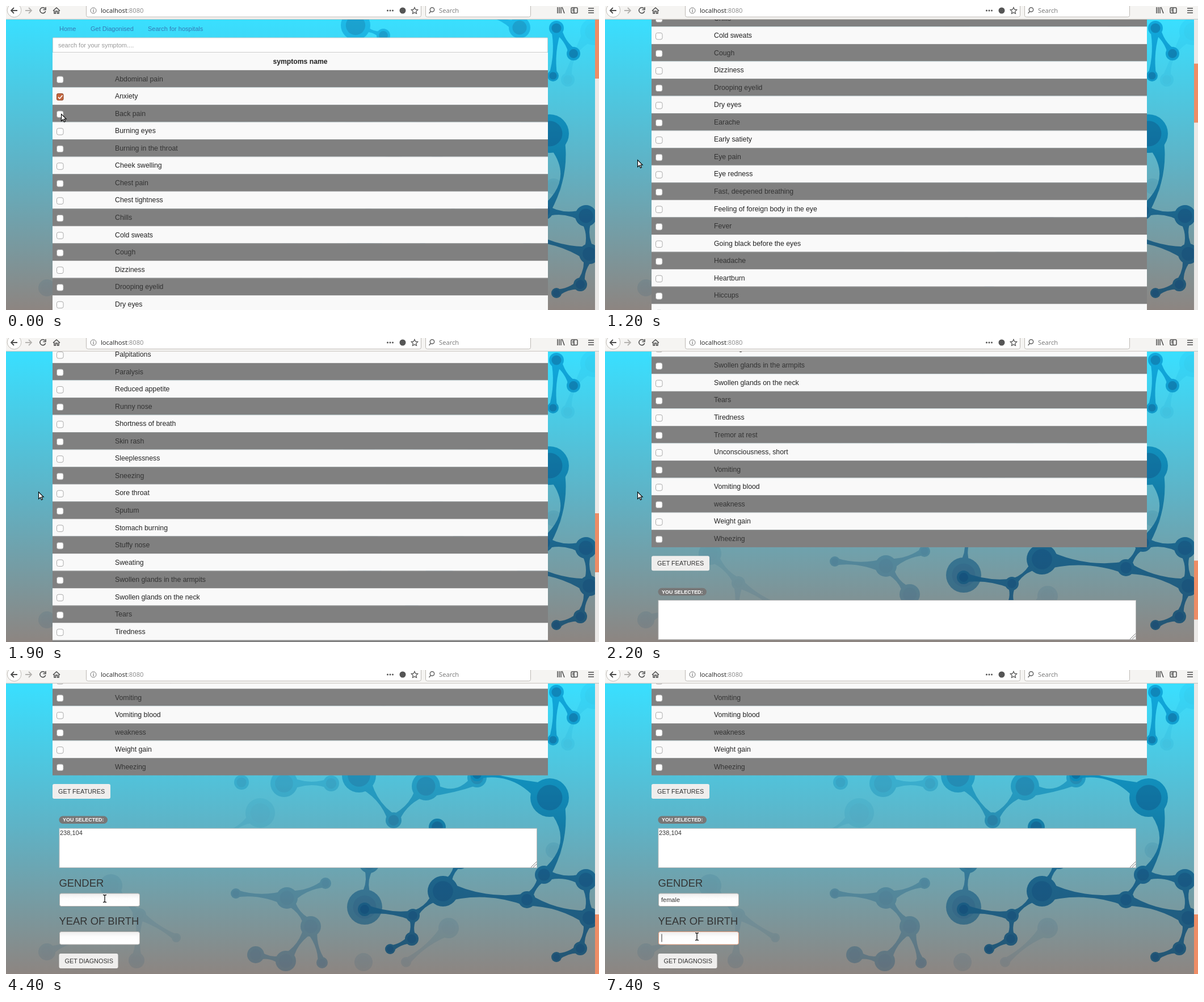
Animation, 1045 px wide and 536 px high, one loop 8 s. Source, as an HTML page:

```html
<!DOCTYPE html>
<html lang="en">
<head>
<meta charset="utf-8">
<title>Symptom checker</title>
<style>
  html, body { margin: 0; width: 100%; height: 100%; overflow: hidden; }
  svg { display: block; width: 1045px; height: 536px; font-family: "Liberation Sans", Arial, sans-serif; }
  text { white-space: pre; }
  .ui { font: 11.2px "Open Sans", sans-serif; }
  .icon { fill: none; stroke: #4b4b4b; stroke-width: 1.5; }
</style>
</head>
<body>
<svg viewBox="0 0 1045 536">
  <defs>
    <linearGradient id="sky" gradientUnits="userSpaceOnUse" x1="0" y1="24" x2="0" y2="536">
      <stop offset="0" stop-color="#39dfff"/><stop offset=".5" stop-color="#5fb2c5"/><stop offset="1" stop-color="#8d8581"/>
    </linearGradient>
    <linearGradient id="deep" gradientUnits="userSpaceOnUse" x1="0" y1="24" x2="0" y2="536">
      <stop offset="0" stop-color="#0ea6dc"/><stop offset=".39" stop-color="#0c86b4"/>
      <stop offset=".68" stop-color="#175f88"/><stop offset="1" stop-color="#1d5070"/>
    </linearGradient>
    <linearGradient id="field" x2="0" y2="1">
      <stop offset="0" stop-color="#ededed"/><stop offset=".4" stop-color="#fdfdfd"/><stop offset="1" stop-color="#fff"/>
    </linearGradient>
  </defs>
  <rect width="1045" height="536" fill="url(#sky)"/>
  <g id="molecules" fill="url(#deep)"></g>
  <g id="page"></g>

  <rect x="1038" y="24" width="7" height="512" fill="#ebe9e7"/>
  <rect id="thumb" x="1038" y="24" width="7" height="104" fill="#ee8d66"/>

  <rect width="1045" height="23.5" fill="#f5f4f2"/>
  <path d="M0 23.3H1045" stroke="#c9c4be"/>
  <g fill="#fff" stroke="#bdb9b4">
    <rect x="141.5" y="-9" width="590" height="28.3" rx="3"/>
    <rect x="739.5" y="-9" width="185" height="28.3" rx="3"/>
    <circle cx="14.500" cy="7.500" r="12.300"/>
  </g>
  <g class="icon">
    <path d="M20 8H9m5-5-5 5 5 5" stroke-width="1.8"/>
    <path d="M34 8H45m-5-5 5 5-5 5" stroke="#b5b3b0" stroke-width="1.8"/>
    <path d="M68.700 4.500A5 5 0 1 0 69.700 9M70 2v4.500h-4.500"/>
    <path d="M83 8.500 89 3l6 5.500M85 8v5h2.500v-4h3v4H93V8"/>
    <circle cx="154" cy="8" r="5" stroke="#777" stroke-width="1"/>
    <path d="M154 7v4m0-6v1.300" stroke="#777" stroke-width="1.200"/>
    <path d="m720 2.500 1.700 3.700 4 .5-3 2.700.8 4-3.500-2-3.500 2 .8-4-3-2.700 4-.5z" stroke-width="1.200"/>
    <circle cx="751" cy="6.500" r="3.700" stroke="#666"/>
    <path d="M748.500 9.500 745.500 13" stroke="#666"/>
    <path d="M972 2v11m3-11v11m3-11v11m2-11 4 11"/>
    <rect x="996" y="3" width="11" height="9.500" rx="1.500"/>
    <path d="M1001 3v9M998 6h2m-2 2.500h2M1026 4h10m-10 4h10m-10 4h10"/>
  </g>
  <g fill="#555">
    <circle cx="672.500" cy="8" r="1.500"/><circle cx="677" cy="8" r="1.500"/><circle cx="681.500" cy="8" r="1.500"/>
    <circle cx="699" cy="8" r="5.500"/>
  </g>
  <text class="ui" x="167" y="12" fill="#222">localhost<tspan fill="#888">:8080</tspan></text>
  <text class="ui" x="763" y="12" fill="#777">Search</text>

  <path id="arrow" d="M.5.5v12.300l3-2.800 2 4.500 2-.9-2-4.300h3.700z" fill="#fff" stroke="#000" stroke-width="1.100"/>
  <g id="beam" fill="none">
    <path d="M-3-6.500q3 0 3 1.500q0-1.500 3-1.500M0-5V5M-3 6.500q3 0 3-1.500q0 1.500 3 1.500" stroke="#fff" stroke-width="2.600"/>
    <path d="M-3-6.500q3 0 3 1.500q0-1.500 3-1.500M0-5V5M-3 6.500q3 0 3-1.500q0 1.500 3 1.500" stroke="#111" stroke-width="1.300"/>
  </g>
</svg>
<script>
const $ = id => document.getElementById(id);
const ROW = 30.55, TABLE_TOP = 113, MAX_SCROLL = 1852, LOOP = 8000;

const symptoms = `Abdominal pain|Anxiety|Back pain|Burning eyes|Burning in the throat|Cheek swelling|Chest pain|
Chest tightness|Chills|Cold sweats|Cough|Dizziness|Drooping eyelid|Dry eyes|Earache|Early satiety|Eye pain|Eye redness|
Fast, deepened breathing|Feeling of foreign body in the eye|Fever|Going black before the eyes|Headache|Heartburn|Hiccups|
Hot flashes|Increased thirst|Itching eyes|Itching in the nose|Lip swelling|Memory gap|Menstruation disorder|Missed period|
Nausea|Neck pain|Nervousness|Night cough|Pain in the limbs|Pain on swallowing|Palpitations|Paralysis|Reduced appetite|
Runny nose|Shortness of breath|Skin rash|Sleeplessness|Sneezing|Sore throat|Sputum|Stomach burning|Stuffy nose|Sweating|
Swollen glands in the armpits|Swollen glands on the neck|Tears|Tiredness|Tremor at rest|Unconsciousness, short|Vomiting|
Vomiting blood|weakness|Weight gain|Wheezing`.replace(/\n/g, '').split('|');

// Molecules: nodes are [x, y, radius], bonds are [from, to, bend]
const clusters = [
  { opacity: .12, nodes: [[72, 497, 15], [125, 475, 8], [185, 380, 20], [235, 432, 12], [300, 472, 8], [230, 512, 14],
      [448, 252, 26], [387, 290, 8], [965, 318, 14], [1036, 45, 24], [990, 130, 12], [630, 515, 16], [780, 455, 18], [705, 515, 9]],
    bonds: [[0, 1], [2, 3], [3, 4], [3, 5], [6, 7], [9, 10, 20], [12, 13]] },
  { opacity: .35, nodes: [[495, 402, 19], [405, 394, 9], [563, 376, 10], [537, 452, 18], [440, 502, 15], [493, 513, 18],
      [557, 516, 10], [490, 200, 24], [573, 200, 14], [415, 198, 13]],
    bonds: [[0, 1], [0, 2], [0, 3], [3, 5], [4, 5], [3, 6], [7, 8]] },
  { opacity: .65, nodes: [[616, 34, 26], [665, 52, 12], [632, 418, 31], [640, 340, 18], [622, 186, 30], [740, 205, 25],
      [830, 190, 17], [683, 265, 14], [905, 38, 19], [845, 12, 10]],
    bonds: [[0, 1], [2, 3], [4, 7], [5, 6, 30], [5, 7], [8, 9]] },
  { opacity: .93, nodes: [[958, 225, 34], [948, 361, 16], [1022, 370, 19], [918, 405, 15], [1028, 437, 18], [1012, 491, 12],
      [970, 506, 9], [770, 390, 27], [717, 433, 12], [715, 474, 12], [677, 492, 9], [632, 422, 12], [970, 39, 13],
      [1000, 84, 12], [964, 123, 10], [800, 335, 16], [760, 277, 15], [830, 184, 12]],
    bonds: [[0, 1, -55], [1, 2], [1, 3], [2, 4], [3, 4], [4, 5], [5, 6], [3, 7], [7, 8], [8, 9], [9, 10], [8, 11],
      [12, 13], [12, 14], [7, 15], [0, 17, 20]] }
];

function bond([x1, y1, r1], [x2, y2, r2], bend = 0) {
  const dx = x2 - x1, dy = y2 - y1, len = Math.hypot(dx, dy), nx = -dy / len, ny = dx / len;
  const a = r1 * .75, b = r2 * .75, waist = 6.5 - (a + b) / 2;
  const at = (x, y, d) => `${(x + nx * d).toFixed(1)} ${(y + ny * d).toFixed(1)}`;
  const mx = (x1 + x2) / 2, my = (y1 + y2) / 2;
  return `<path d="M${at(x1, y1, a)}Q${at(mx, my, bend + waist)} ${at(x2, y2, b)}L${at(x2, y2, -b)}` +
    `Q${at(mx, my, bend - waist)} ${at(x1, y1, -a)}Z"/>`;
}

$('molecules').innerHTML = clusters.map(({ opacity, nodes, bonds }) =>
  `<g opacity="${opacity}">` +
  bonds.map(([i, j, bend]) => bond(nodes[i], nodes[j], bend)).join('') +
  nodes.map(([x, y, r]) => `<circle cx="${x}" cy="${y}" r="${r}"/>` +
    `<circle cx="${x}" cy="${y}" r="${r * .66}" fill="#0b3f72" opacity=".35"/>`).join('') + '</g>').join('');

const rect = (x, y, w, h, fill, more = '') =>
  `<rect x="${x}" y="${y}" width="${w}" height="${h}" fill="${fill}" ${more}/>`;
const text = (x, y, size, str, fill = '#333', more = '') =>
  `<text x="${x}" y="${y}" font-size="${size}" fill="${fill}" ${more}>${str}</text>`;
const button = (x, y, w, label) => rect(x, y, w, 26, '#efeeed', 'rx="3"') + text(x + 10, y + 17, 10.85, label);
const input = (id, y) => rect(94.5, y, 141, 22.5, 'url(#field)', `id="${id}" rx="3"`);

function tableRow(name, i) {
  const y = TABLE_TOP + i * ROW, odd = i % 2;
  return rect(82, y, 873, ROW + .1, odd ? '#f9f9f9' : '#808080') + rect(82, y, 873, .8, odd ? '#ddd' : '#999') +
    text(192, y + 19.6, 12.3, name, odd ? '#222' : '#333') +
    `<g id="box${i}">` + rect(89.5, y + 11, 11.5, 11.5, '#fff', 'rx="3" stroke="#a9a9a9"') + '</g>';
}

$('page').innerHTML =
  text(94, 44, 11, 'Home', '#337ab7') + text(149, 44, 11, 'Get Diagonised', '#337ab7') +
  text(250, 44, 11, 'Search for hospitals', '#337ab7') +
  rect(82.5, 56, 872, 25.5, '#fff', 'stroke="#ccc" rx="1"') +
  text(92, 73, 11, 'search for your symptom....', '#999') +
  rect(82, 82, 873, 31, '#f9f9f9') +
  text(518.5, 102, 12.2, 'symptoms name', '#222', 'font-weight="bold" text-anchor="middle"') +
  symptoms.map(tableRow).join('') +
  `<g transform="translate(0 ${MAX_SCROLL})">` +
  button(82, 201, 102, 'GET FEATURES') +
  rect(93.5, 257.5, 85.5, 13.5, '#777', 'rx="6.7"') +
  text(136.3, 267.4, 8.95, 'YOU SELECTED:', '#fff', 'font-weight="bold" text-anchor="middle"') +
  rect(94, 279.3, 841.5, 69.2, '#fff', 'stroke="#bbb"') +
  '<path d="M925 348l10-10m-6 10 6-6" stroke="#777"/>' +
  text(95, 291, 11, '', '#333', 'id="selected"') +
  text(93.5, 381.5, 18.4, 'GENDER') + input('gender', 394) + text(99, 409, 11, '', '#333', 'id="typed"') +
  text(93.5, 448.5, 18.4, 'YEAR OF BIRTH') + input('birth', 461.5) +
  '<rect id="caret" width="1" height="14" fill="#333"/>' +
  button(93.5, 500, 104, 'GET DIAGNOSIS') + '</g>';

// Step tracks: the last entry whose time has come holds
const pointer = [[0, 97, 190], [600, 72, 238], [700, 57, 271], [4400, 174, 403, 'beam'], [4900, 243, 416], [5600, 240, 462],
  [5700, 250, 414], [6100, 247, 400], [6500, 146, 490], [6900, 223, 474, 'beam'], [7400, 162, 470, 'beam']];
const typing = [[0, ''], [5600, 'fe'], [5700, 'femal'], [6100, 'female']];
const current = (track, t) => track.filter(([at]) => at <= t).pop();

const mix = (a, b, k) => a + (b - a) * k;
function scrollAt(t) {
  if (t < 900) return 0;
  if (t < 1200) return 351.5 * ((t - 900) / 300) ** 1.25;
  if (t < 1600) return mix(351.5, 870, (t - 1200) / 400);
  if (t < 1900) return mix(870, 1291, (t - 1600) / 300);
  const left = Math.max(0, 1 - (t - 1900) / 700);
  return mix(MAX_SCROLL, 1291, left * left);
}

function check(i, on) {
  const box = $('box' + i);
  if (box.dataset.on === String(on)) return;
  box.dataset.on = on;
  const y = TABLE_TOP + i * ROW + 11;
  box.innerHTML = rect(89.5, y, 11.5, 11.5, on ? '#c4663f' : '#fff', `rx="${on ? 2 : 3}" stroke="${on ? '#8b4527' : '#a9a9a9'}"`) +
    (on ? `<path d="M92 ${y + 6}l2.500 2.700 5-5.700" fill="none" stroke="#fff" stroke-width="1.700"/>` : '');
}

function draw(t) {
  const scroll = scrollAt(t);
  $('page').setAttribute('transform', `translate(0 ${-scroll})`);
  $('thumb').setAttribute('y', 24 + scroll * .2208 - (t >= 4400 ? 2 : 0));
  $('thumb').setAttribute('height', t >= 4400 ? 106 : 104);
  check(1, true);
  check(2, t >= 400);

  $('selected').textContent = t >= 4400 ? '238,104' : '';
  $('typed').textContent = current(typing, t)[1];
  const focus = t >= 7400 ? 'birth' : t >= 4900 ? 'gender' : '';
  for (const id of ['gender', 'birth']) $(id).setAttribute('stroke', id === focus ? '#e79a78' : '#b5b2af');
  $('caret').setAttribute('visibility', focus ? 'visible' : 'hidden');
  $('caret').setAttribute('x', 99.5 + (focus === 'gender' ? $('typed').getComputedTextLength() : 0));
  $('caret').setAttribute('y', focus === 'birth' ? 465.5 : 398);

  const [, x, y, shape = 'arrow'] = current(pointer, t);
  for (const id of ['arrow', 'beam']) {
    $(id).setAttribute('visibility', id === shape ? 'visible' : 'hidden');
    $(id).setAttribute('transform', `translate(${x} ${y})`);
  }
}

const start = performance.now();
function tick() {
  const t = (performance.now() - start) % LOOP;
  draw(Math.floor(t / 100) * 100);
  requestAnimationFrame(tick);
}
tick();
</script>
</body>
</html>
```
